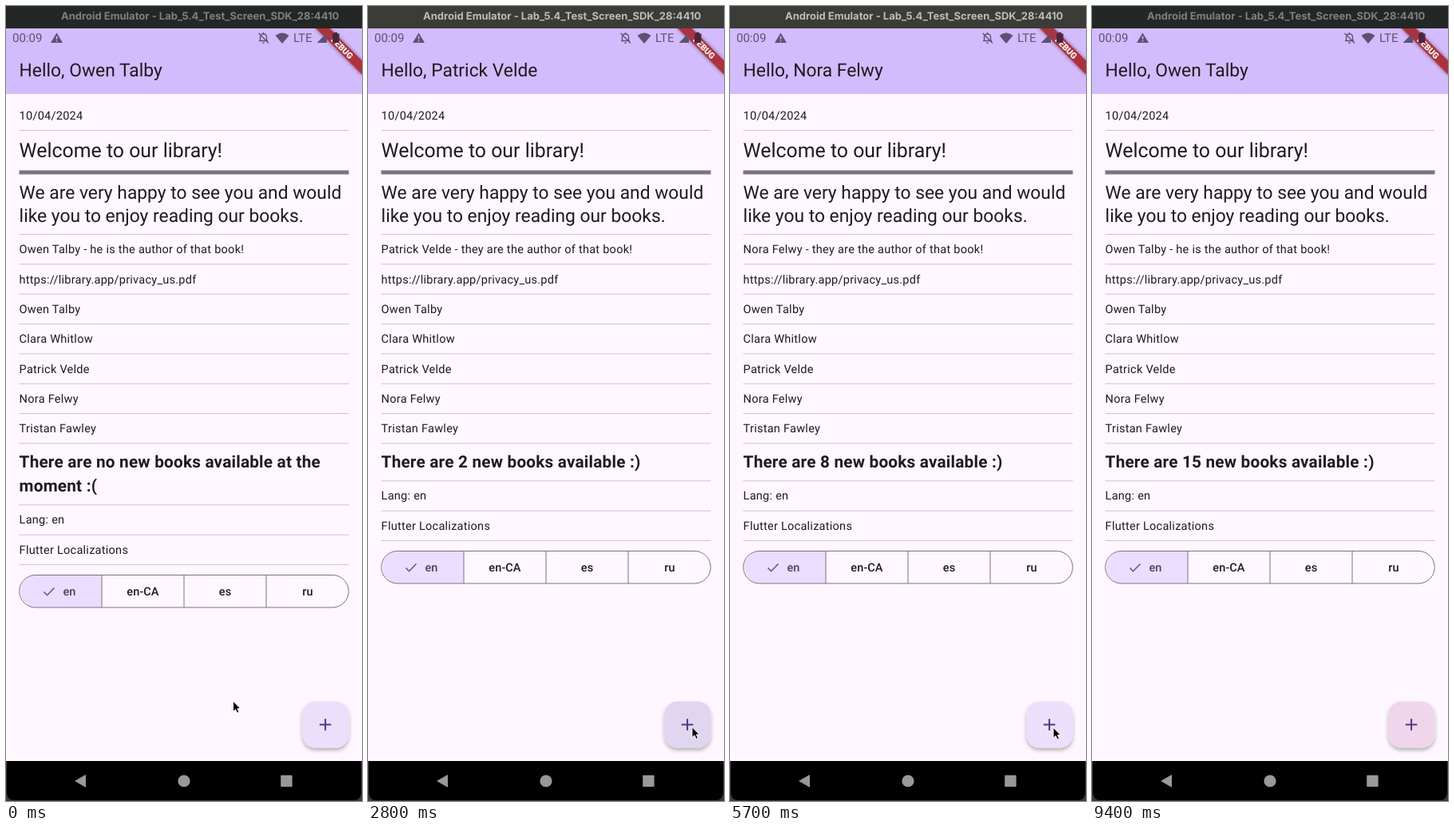
An HTML page for the animation above (9500 ms loop, 446x994 px).

```html
<!DOCTYPE html>
<html lang="en">
<head>
<meta charset="utf-8">
<title>Library greeting</title>
<style>
  html, body { margin: 0; width: 446px; height: 994px; overflow: hidden; background: #fef7ff; }
  svg { display: block; }
  text { font: 14.52px Roboto, sans-serif; letter-spacing: .26px; fill: #1d1b20; white-space: pre; text-rendering: geometricPrecision; }
  .large { font-size: 22.82px; letter-spacing: 0; }
  .welcome { font-size: 24.89px; letter-spacing: 0; }
  .news { font-size: 20.74px; font-weight: 700; letter-spacing: .21px; }
  .segment { font-weight: 500; letter-spacing: .1px; text-anchor: middle; }
  .status { font-size: 15px; letter-spacing: 0; fill: #5d5273; }
  .debug { font-size: 10.6px; font-weight: 900; letter-spacing: 0; text-anchor: middle; fill: #fff; }
  .window { font: 700 13px Inter, sans-serif; letter-spacing: 0; }
  .rule { stroke: #cac4d0; }
  .outline { stroke: #79747e; fill: none; }
</style>
</head>
<body>
<svg width="446" height="994" viewBox="0 0 446 994">
  <defs>
    <filter id="lift" x="-30%" y="-30%" width="160%" height="170%">
      <feDropShadow dx="0" dy="3" stdDeviation="2.6" flood-color="#000" flood-opacity=".3"/>
    </filter>
    <filter id="glow" x="-20%" y="-100%" width="140%" height="300%">
      <feDropShadow dx="0" dy="0" stdDeviation="2.5" flood-opacity=".45"/>
    </filter>
  </defs>

  <rect width="446" height="994" fill="#fef7ff"/>
  <rect y="27" width="446" height="83" fill="#d3bcfd"/>
  <text id="hello" class="large" x="16.6" y="88.3"></text>

  <g id="list">
    <text x="16.6" y="142.2">10/04/2024</text>
    <text class="welcome" x="16.6" y="189">Welcome to our library!</text>
    <path d="M16.5 208H429.5" stroke="#79747e" stroke-width="5"/>
    <text class="large" x="16.6" y="240.8">We are very happy to see you and would</text>
    <text class="large" x="16.6" y="270">like you to enjoy reading our books.</text>
    <text id="author" x="16.6" y="309.2"></text>
    <text id="news" class="news" x="16.6" y="577.3"></text>
    <text id="news2" class="news" x="16.6" y="607.3">moment :(</text>
  </g>

  <g id="footer">
    <path class="rule" d="M16.5 623.8H429.5M16.5 661.2H429.5M16.5 698.5H429.5"/>
    <text x="16.6" y="647.4">Lang: en</text>
    <text x="16.6" y="684.8">Flutter Localizations</text>
    <path d="M120 711.5H37A20.3 20.3 0 0 0 37 752H120Z" fill="#eaddff"/>
    <rect class="outline" x="16.7" y="711.5" width="412.6" height="40.5" rx="20.25"/>
    <path class="outline" d="M120 711.5V752M223 711.5V752M326 711.5V752"/>
    <path d="M47.5 732.5l4 4.2 9-9.2" fill="none" stroke="#65558f" stroke-width="1.6"/>
    <text class="segment" x="79.5" y="736.8" style="fill:#4a4458">en</text>
    <text class="segment" x="171.5" y="736.8">en-CA</text>
    <text class="segment" x="274.5" y="736.8">es</text>
    <text class="segment" x="378" y="736.8">ru</text>
  </g>

  <rect id="fab" x="371.3" y="869.4" width="58.1" height="58.1" rx="16.6" filter="url(#lift)"/>
  <path d="M392.8 898.5h14.6M400.1 891.2v14.6" stroke="#4f378b" stroke-width="2"/>

  <g transform="translate(446 27.3) rotate(45)">
    <rect x="-41.5" y="29" width="83" height="12.45" fill="#ae313d" filter="url(#glow)"/>
    <text class="debug" y="39.1">DEBUG</text>
  </g>

  <text class="status" x="8" y="45.3">00:09</text>
  <text class="status" x="360" y="45.3">LTE</text>
  <g fill="#5d5273">
    <path fill-rule="evenodd" d="M63.5 33.5L71 46H56ZM62.8 37.8v4h1.5v-4ZM62.8 43v1.5h1.5v-1.5Z"/>
    <path d="M337.5 37Q346 30 354.5 37L346 47Z"/>
    <path d="M402 33.5V46H389.5Z"/>
    <path d="M411 34.5V33h4v1.5h2.5V46h-8.5V34.5Z" fill="#48273f"/>
    <path d="M321 45.5h3a1.5 1.5 0 0 1-3 0Z"/>
  </g>
  <path d="M317 43.5h11M318.5 43V39Q318.500 35 322.5 35T326.5 39V43M322.5 35V33M316.5 34L329 46.5"
    fill="none" stroke="#5d5273" stroke-width="1.4"/>

  <rect id="bar" width="446" height="28"/>
  <text id="window" class="window" x="69" y="17">Android Emulator - Lab_5.4_Test_Screen_SDK_28:4410</text>

  <path d="M0 944H446V994H0Z" fill="#3a3a3a"/>
  <path d="M1 944H445V983Q445 993 435 993H11Q1 993 1 983Z" fill="#000"/>
  <g fill="#999">
    <path d="M86 969L100 961V977Z"/>
    <circle cx="223" cy="969" r="7.6"/>
    <rect x="344.2" y="961.8" width="14.4" height="14.4" rx="1"/>
  </g>

  <path id="cursor" d="M0 0V13.2L3 10.4 5.1 15 7.5 14 5.4 9.5H9.3Z" fill="#000" stroke="#fff"/>
</svg>

<script>
const LOOP = 9500;
const people = ["Owen Talby", "Clara Whitlow", "Patrick Velde", "Nora Felwy", "Tristan Fawley"];
const pronouns = ["he is", "she is", "they are"];
const clicks = [1800, 2600, 3100, 3500, 3950, 4300, 4600, 5200, 5750, 6300, 6850, 7400, 7900, 8600, 9250];
// Cursor tip: time, x, y
const path = [[0, 284.5, 869], [200, 284.5, 869], [1400, 407, 904], [2100, 407, 904], [3500, 405, 899],
  [4700, 405, 901], [6500, 405, 903], [8100, 403, 905], [LOOP, 403, 905]];

const $ = id => document.getElementById(id);
const setText = (id, value) => { if ($(id).textContent !== value) $(id).textContent = value; };

function add(tag, attrs, value = "") {
  const node = document.createElementNS("http://www.w3.org/2000/svg", tag);
  for (const key in attrs) node.setAttribute(key, attrs[key]);
  node.textContent = value;
  $("list").append(node);
}

const rule = y => add("path", { class: "rule", d: `M16.5 ${y}H429.5` });
rule(155.5);
for (let i = 0; i < 8; i++) rule(285.5 + i * 37.34);
["https://library.app/privacy_us.pdf", ...people].forEach((line, i) =>
  add("text", { x: 16.6, y: 346.5 + i * 37.34 }, line));

function cursorAt(t) {
  const i = path.findIndex(p => p[0] > t);
  const [t0, x0, y0] = path[i - 1], [t1, x1, y1] = path[i];
  const u = (t - t0) / (t1 - t0), k = u * u * (3 - 2 * u);
  return [x0 + (x1 - x0) * k, y0 + (y1 - y0) * k];
}

function news(count) {
  if (!count) return "There are no new books available at the";
  return count === 1 ? "There is 1 new book available :)" : `There are ${count} new books available :)`;
}

function draw(t) {
  const count = clicks.filter(c => c <= t).length;
  const age = count ? t - clicks[count - 1] : Infinity;
  const name = people[count % people.length];
  const active = t >= 1600 && t < 9300;

  setText("hello", `Hello, ${name}`);
  setText("author", `${name} - ${pronouns[count % 3]} the author of that book!`);
  setText("news", news(count));
  $("news2").setAttribute("visibility", count ? "hidden" : "visible");
  $("footer").setAttribute("transform", `translate(0 ${count ? -30 : 0})`);
  $("fab").setAttribute("fill", age < 160 ? "#f0d6eb" : age < 280 ? "#e0d6ef" : "#ecdffb");
  $("bar").setAttribute("fill", active ? "#3b3c38" : "#232725");
  $("window").style.fill = active ? "#bdbcb8" : "#7f817f";
  $("cursor").setAttribute("transform", `translate(${cursorAt(t)})`);
  $("cursor").setAttribute("visibility", t < 9300 ? "visible" : "hidden");
}

const start = performance.now();
function tick() {
  draw((performance.now() - start) % LOOP);
  requestAnimationFrame(tick);
}
tick();
</script>
</body>
</html>
```
